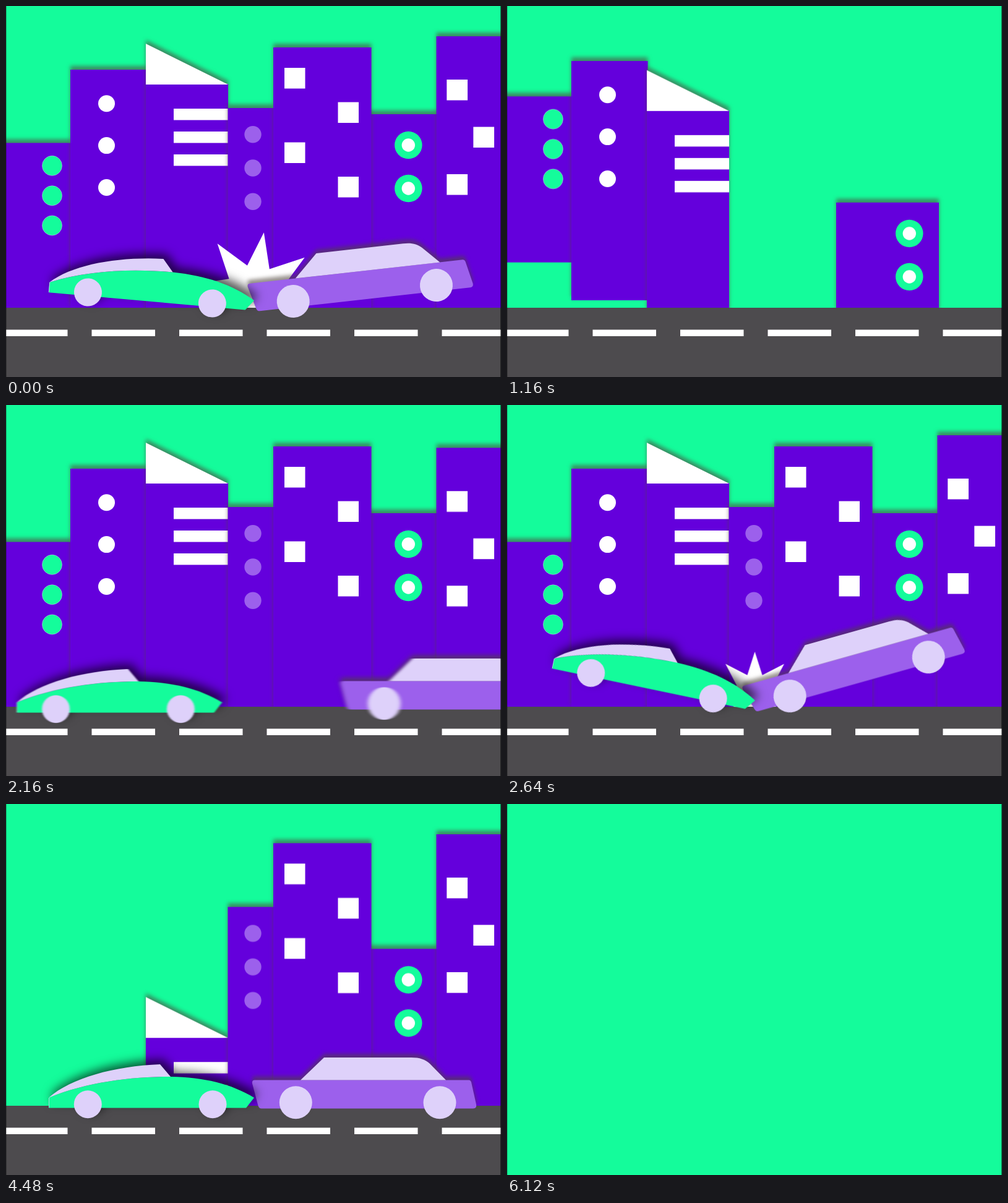
An HTML page without scripts for the animation above (6.36 s loop, 800 px wide and 600 px high).

```html
<!DOCTYPE html>
<html lang="en">
<head>
<meta charset="utf-8">
<title>City crash</title>
<style>
  html, body { margin: 0; width: 100%; height: 100%; overflow: hidden; background: #14fc9b; }
  svg { display: block; width: 100%; height: 100%; }

  .sky, .mint { fill: #14fc9b; }
  .wall { fill: #6400dc; }
  .white { fill: #fff; }
  .violet { fill: #9c60ec; }
  .pale { fill: #ded1fa; }
  .rim { stroke: #ded1fa; stroke-opacity: .6; stroke-width: .8; }

  .house, .saloon { filter: drop-shadow(0 -6px 3px rgba(80, 70, 62, .6)); }
  .coupe { filter: drop-shadow(6px -8px 8px rgba(0, 0, 0, .65)); }

  /* Buildings: --h hidden depth, --o overshoot, --in and --out start times */
  .rise {
    animation: rise 6360ms var(--in) infinite backwards, sink 6360ms var(--out) infinite backwards;
  }
  @keyframes rise {
    0% { translate: 0 var(--h); animation-timing-function: cubic-bezier(.4, 0, .2, 1); }
    6.289% { translate: 0 var(--o); animation-timing-function: ease-in-out; }
    10.06% { translate: 0 0; animation-timing-function: step-end; }
    75%, 100% { translate: 0 var(--h); }
  }
  @keyframes sink {
    0% { transform: translateY(0); animation-timing-function: cubic-bezier(.6, -.1, .75, .3); }
    5.66% { transform: translateY(var(--h)); animation-timing-function: step-end; }
    42%, 100% { transform: translateY(0); }
  }

  .ground { animation: ground 6360ms infinite; }
  @keyframes ground {
    0%, 8.3% { transform: translateY(115px); animation-timing-function: cubic-bezier(.3, 0, .3, 1); }
    12.4%, 80% { transform: translateY(0); animation-timing-function: cubic-bezier(.5, 0, .8, .4); }
    88%, 100% { transform: translateY(215px); }
  }

  .coupe-drive { animation: coupe-drive 6360ms linear infinite, coupe-smear 6360ms step-end infinite; }
  @keyframes coupe-drive {
    0%, 27.04% { transform: translate(-450px, 6px); animation-timing-function: cubic-bezier(.3, .3, .6, .9); }
    33.96% { transform: translate(-52px, 6px); }
    37.11% { transform: translate(0, 6px); }
    39.6%, 100% { transform: translate(0, 0); }
  }
  @keyframes coupe-smear {
    0% { filter: none; }
    27% { filter: url(#smear-soft); }
    37% { filter: none; }
  }

  .saloon-drive { animation: saloon-drive 6360ms linear infinite, saloon-smear 6360ms step-end infinite; }
  @keyframes saloon-drive {
    0%, 27.04% { transform: translateX(440px); }
    33.96% { transform: translateX(143.5px); }
    37.74%, 100% { transform: translateX(0); }
  }
  @keyframes saloon-smear {
    0% { filter: none; }
    27% { filter: url(#smear); }
    37.6% { filter: none; }
  }

  .coupe-tilt { --a: 11.8deg; transform-origin: 387px 476px; animation: tilt 6360ms infinite; }
  .saloon-tilt { --a: -15.7deg; transform-origin: 419px 517px; animation: tilt 6360ms infinite; }
  @keyframes tilt {
    0%, 37.5% { transform: rotate(0deg); animation-timing-function: cubic-bezier(.2, .5, .5, 1); }
    41.51% { transform: rotate(var(--a)); animation-timing-function: cubic-bezier(.5, 0, .8, .7); }
    50%, 100% { transform: rotate(0deg); }
  }

  .burst { animation: burst 6360ms linear infinite; }
  @keyframes burst {
    0%, 37.74% { transform: translate(400.5px, 466px) rotate(-8deg) scale(0); }
    41.51% { transform: translate(400.5px, 466px) rotate(0deg) scale(.67); }
    46% { transform: translate(401px, 466px) rotate(9deg) scale(1.01); }
    48% { transform: translate(401px, 466px) rotate(12deg) scale(1.01); }
    53%, 100% { transform: translate(401px, 466px) rotate(20deg) scale(0); }
  }

  .opening { animation: opening 6360ms step-end infinite; }
  @keyframes opening {
    0% { visibility: visible; }
    1.887%, 100% { visibility: hidden; }
  }
</style>
</head>
<body>
<svg viewBox="0 0 800 600" preserveAspectRatio="none">
  <defs>
    <clipPath id="above"><rect width="800" height="489"/></clipPath>
    <filter id="smear" filterUnits="userSpaceOnUse" x="-600" y="300" width="2000" height="320" color-interpolation-filters="sRGB">
      <feGaussianBlur stdDeviation="3 0"/>
    </filter>
    <filter id="smear-soft" filterUnits="userSpaceOnUse" x="-600" y="300" width="2000" height="320" color-interpolation-filters="sRGB">
      <feGaussianBlur stdDeviation="1.6 0"/>
    </filter>

    <g id="dots" class="house">
      <rect class="wall" x="-10" y="221.5" width="116" height="194.5"/>
      <rect class="wall" x="-10" y="410" width="116" height="80"/>
      <g class="mint rim">
        <circle cx="74.5" cy="258.3" r="16"/><circle cx="74.5" cy="306.7" r="16"/><circle cx="74.5" cy="355" r="16"/>
      </g>
    </g>
    <g id="tower" class="house">
      <rect class="wall" x="104" y="103" width="123.5" height="387"/>
      <g class="white">
        <circle cx="162.5" cy="157.8" r="13.5"/><circle cx="162.5" cy="225.6" r="13.5"/><circle cx="162.5" cy="293.5" r="13.5"/>
      </g>
    </g>
    <g id="slant" class="house">
      <rect class="wall" x="226" y="126" width="133" height="404"/>
      <path class="white" d="M226 61 359 127H226ZM271 166H359V184.5H271ZM271 203H359V221.5H271ZM271 240H359V258.5H271Z"/>
    </g>
    <g id="narrow" class="house">
      <rect class="wall" x="358.5" y="165" width="75" height="345"/>
      <g class="violet">
        <circle cx="399" cy="207.7" r="13.7"/><circle cx="399" cy="262" r="13.7"/><circle cx="399" cy="316.2" r="13.7"/>
      </g>
    </g>
    <g id="rings" class="house">
      <rect class="wall" x="532" y="175" width="166" height="335"/>
      <g class="mint"><circle cx="650.3" cy="225" r="22.3"/><circle cx="650.3" cy="295" r="22.3"/></g>
      <g class="white"><circle cx="650.3" cy="225" r="10.7"/><circle cx="650.3" cy="295" r="10.7"/></g>
    </g>
    <g id="block" class="house">
      <rect class="wall" x="432" y="67" width="158.5" height="443"/>
      <path class="white" d="M450 100h33.5v33.5h-33.5zM536.5 155.5h33.5v33.5h-33.5zM450 220.5h33.5v33.5h-33.5zM536.5 276h33.5v33.5h-33.5z"/>
    </g>
    <g id="edge" class="house">
      <rect class="wall" x="695.5" y="49" width="115" height="461"/>
      <path class="white" d="M712.3 119h33.7v33.5h-33.7zM755.3 195.5h33.7v33.5h-33.7zM712.3 272h33.7v33.5h-33.7z"/>
    </g>

    <polygon id="star" class="white" points="0,-100 18,-43.4 70.7,-70.7 43.4,-18 100,0 43.4,18 70.7,70.7 18,43.4 0,100 -18,43.4 -70.7,70.7 -43.4,18 -100,0 -43.4,-18 -70.7,-70.7 -18,-43.4"/>

    <g id="road">
      <rect y="488" width="800" height="120" fill="#4d4b4e"/>
      <path d="M-3 528.8H800" stroke="#fff" stroke-width="10.5" stroke-dasharray="102.5 39"/>
    </g>

    <g id="coupe">
      <path class="mint" d="M69 491.500V475C130 450 200 441 266 441C320 442 363 452 401 475L388 491.500Z"/>
      <path class="pale" d="M69 475C105 443 175 424 249 421L266 441C200 441 130 450 69 475Z"/>
      <path d="M69.400 475V491" stroke="#ded1fa" stroke-width=".8"/>
      <g class="pale"><circle cx="132.300" cy="485.700" r="22.500"/><circle cx="334" cy="485.700" r="22.500"/></g>
    </g>
    <g id="saloon">
      <path class="violet" d="M402 446.500H748Q751 446.500 752 450L760 486Q761 492.500 755 492.500H413Q409 492.500 407.500 488L398 452Q397 446.500 402 446.500Z"/>
      <path class="pale" d="M476 446.500 514 410H655C669 410 677 413 685 420L711 446.500Z"/>
      <g class="pale"><circle cx="468.300" cy="482.800" r="26.500"/><circle cx="701" cy="482.800" r="26.500"/></g>
    </g>
  </defs>

  <rect class="sky" width="800" height="600"/>

  <g clip-path="url(#above)">
    <use href="#dots" class="rise" style="--h:285px;--o:-76px;--in:745ms;--out:4000ms"/>
    <use href="#tower" class="rise" style="--h:402px;--o:-17px;--in:805ms;--out:4080ms"/>
    <use href="#slant" class="rise" style="--h:444px;--o:-12px;--in:919ms;--out:4180ms"/>
    <use href="#narrow" class="rise" style="--h:340px;--o:-15px;--in:1200ms;--out:4360ms"/>
    <use href="#rings" class="rise" style="--h:330px;--o:-15px;--in:1014ms;--out:4260ms"/>
    <use href="#block" class="rise" style="--h:438px;--o:-22px;--in:1380ms;--out:4460ms"/>
    <use href="#edge" class="rise" style="--h:456px;--o:-4px;--in:1873ms;--out:4620ms"/>
    <use href="#star" class="burst"/>
  </g>

  <g class="ground">
    <use href="#road"/>
    <g class="saloon"><g class="saloon-drive"><g class="saloon-tilt"><use href="#saloon"/></g></g></g>
    <g class="coupe"><g class="coupe-drive"><g class="coupe-tilt"><use href="#coupe"/></g></g></g>
  </g>

  <!-- Opening still of the crash -->
  <g class="opening">
    <rect class="sky" width="800" height="600"/>
    <g clip-path="url(#above)">
      <use href="#dots"/><use href="#tower"/><use href="#slant"/><use href="#narrow"/>
      <use href="#rings"/><use href="#block"/><use href="#edge"/>
      <use href="#star" transform="translate(401 466) rotate(9) scale(1.01)"/>
    </g>
    <use href="#road"/>
    <g class="saloon"><use href="#saloon" transform="rotate(-6.4 419 517)"/></g>
    <g class="coupe"><use href="#coupe" transform="rotate(5.1 387 476)"/></g>
  </g>

  <path d="M.5 0V600" stroke="#000" stroke-opacity=".3"/>
  <path d="M799.5 0V600" stroke="#000" stroke-opacity=".6"/>
</svg>
</body>
</html>
```
